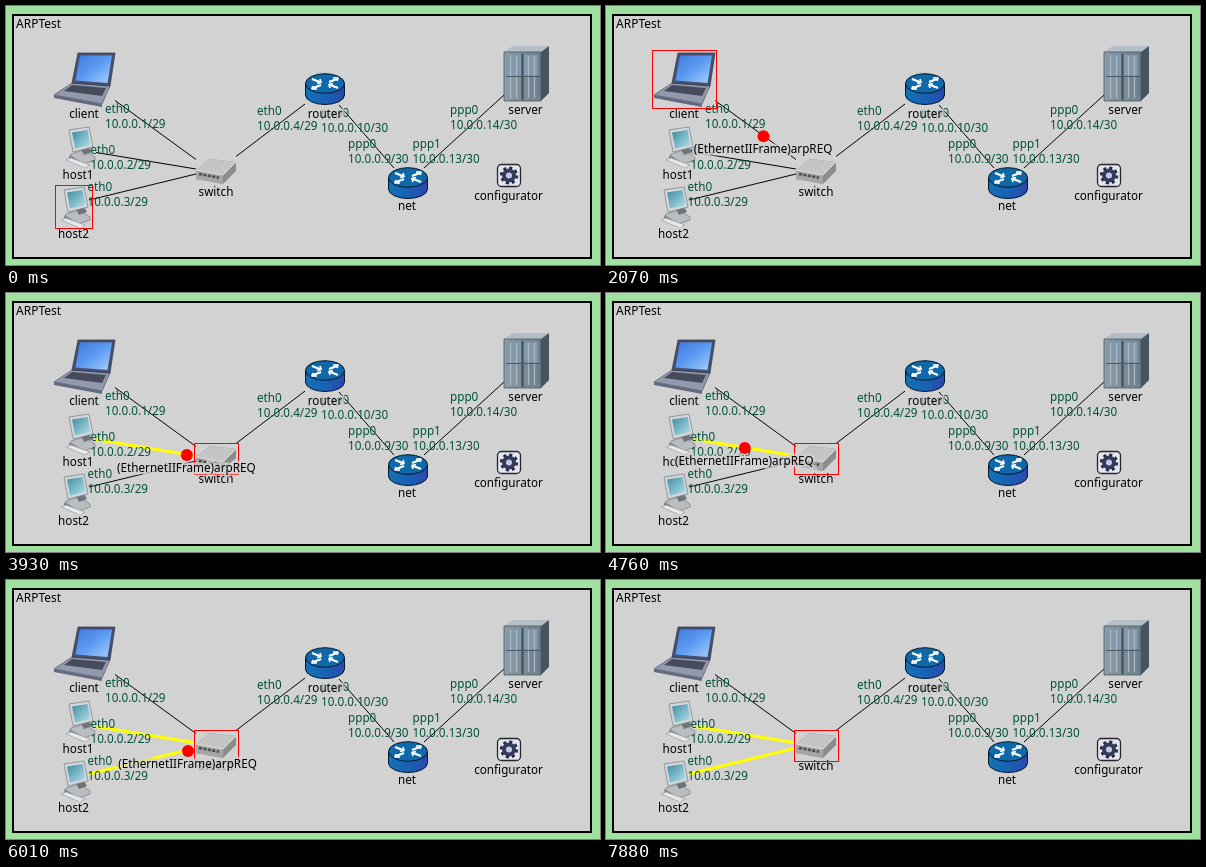
An HTML page for the animation above (8000 ms loop, 594 by 259 pixels).

```html
<!DOCTYPE html>
<html lang="en">
<head>
<meta charset="utf-8">
<title>Network simulation</title>
<style>
  html, body { margin: 0; width: 100%; height: 100%; overflow: hidden; background: #a0e0a0; }
  svg { display: block; width: 594px; height: 259px; }
  text { font: 11.7px "Noto Sans", "Open Sans", sans-serif; white-space: pre; }
  #ports { fill: #00503c; }
  #names { text-anchor: middle; }
  /* Labels dim whatever lies behind them */
  #names text, #packet text { paint-order: stroke; stroke: #d2d2d2; stroke-width: 5; stroke-opacity: .7; }
  #links { stroke: #000; }
  #links .hot { stroke: #ff0; stroke-width: 3; }
</style>
</head>
<body>
<svg viewBox="0 0 594 259">
  <defs>
    <linearGradient id="screen" x2="1" y2="1">
      <stop stop-color="#3f78dc"/><stop offset=".5" stop-color="#5d9cf2"/><stop offset="1" stop-color="#a8d0fa"/>
    </linearGradient>
    <linearGradient id="teal" x2="1" y2="1">
      <stop stop-color="#3f8ba0"/><stop offset="1" stop-color="#b4e2ea"/>
    </linearGradient>
    <linearGradient id="blue">
      <stop stop-color="#1272b4"/><stop offset=".5" stop-color="#1862b4"/><stop offset="1" stop-color="#2a48ac"/>
    </linearGradient>
    <linearGradient id="steel">
      <stop stop-color="#8d9ca6"/><stop offset="1" stop-color="#6c7f8c"/>
    </linearGradient>

    <g id="pc">
      <path d="M6 27l13-4 11 7v3l-14 5-12-7z" fill="#b9bdc0" stroke="#777b80" stroke-width=".7"/>
      <path d="M4 31l12 7v-3L5 28z" fill="#85898e"/>
      <path d="M16 22l8-2 3 5-8 3z" fill="#6d7378"/>
      <path d="M4 3l20-3 4 20-20 5z" fill="#d3d7da" stroke="#81878c" stroke-width=".8"/>
      <path d="M7 5.500l15.500-2.500 3 15-15.500 3.500z" fill="url(#teal)"/>
      <path d="M1 33l5-2 19 7-5 3z" fill="#e6e8ea" stroke="#8a8e92" stroke-width=".6"/>
    </g>

    <g id="hub" stroke-linejoin="round">
      <path d="M-19.500-5v11a19.500 9.500 0 0 0 39 0v-11z" fill="url(#blue)" stroke="#06182c"/>
      <ellipse cy="-5.500" rx="19.500" ry="9.800" fill="#0f68a8" stroke="#06182c"/>
      <g fill="none" stroke="#fff" stroke-width="2.200">
        <path d="M-13-10l9 3.500M-4-4l-9 3.500M4-7l9-3.500M13-1l-9-3.500"/>
        <path d="M-8-5.500l4-1-1-3.500M8-5.500l-4 1 1 3.500M8-11h5l-1 3M-8 0h-5l1-3" stroke-width="1.700"/>
      </g>
    </g>
  </defs>

  <rect width="594" height="259" fill="#a0e0a0"/>
  <rect x="7" y="9" width="578" height="243" fill="#d2d2d2" stroke="#000" stroke-width="2"/>
  <text x="10" y="22" style="font-size:12px">ARPTest</text>

  <g id="links"></g>

  <!-- laptop -->
  <path d="M66 77l38 3-8 18-48-9z" fill="#9299ac" stroke="#4d5368" stroke-width=".7"/>
  <path d="M66 79l34 3-4 8-38-5z" fill="#464b5c"/>
  <path d="M48 89l48 9v3l-48-9z" fill="#646a7e"/>
  <path d="M72 47h37l-5 33-38-3z" fill="#47506e" stroke="#2d3450" stroke-width=".7"/>
  <path d="M74 49.500h32l-4.500 27.500-32-2.500z" fill="url(#screen)"/>

  <use href="#pc" x="59" y="121"/>
  <use href="#pc" x="54" y="181"/>

  <!-- switch -->
  <path d="M190 164l14-11 26 3v9l-13 13-27-5z" fill="#8c8c8c"/>
  <path d="M190 164l14-11 26 3-13 13z" fill="#c4c4c4"/>
  <path d="M190 164l27 5v9l-27-5z" fill="#a5a5a5"/>
  <path d="M193 168l20 3.700" stroke="#4a4a4a" stroke-width="2.500" stroke-dasharray="3 1.500"/>
  <path d="M190 164l27 5 13-13" fill="none" stroke="#eee" stroke-width=".8"/>

  <use href="#hub" x="319" y="83"/>
  <use href="#hub" x="402" y="177"/>

  <!-- server -->
  <path d="M498 46l9-6h36l-8 6z" fill="#b4bec6"/>
  <path d="M535 46l8-6v47l-8 8z" fill="#465460"/>
  <path d="M498 46h37v49h-37z" fill="url(#steel)" stroke="#4a5862" stroke-width=".8"/>
  <path d="M501 49h31v20h-31z" fill="#8199aa"/>
  <path d="M504.500 50v42M510.500 50v42M522.500 50v42M528.500 50v42" stroke="#a9bac6" stroke-width="1.300"/>
  <path d="M516.500 48v46" stroke="#3c4c58" stroke-width="2"/>
  <path d="M500 70.500h34" stroke="#4c5c68"/>

  <!-- configurator -->
  <rect x="491.500" y="158.500" width="23" height="22" rx="4" fill="#e2e5f0" stroke="#26262c" stroke-width="1.300"/>
  <circle cx="503" cy="169.500" r="7.600" fill="none" stroke="#24273a" stroke-width="3" stroke-dasharray="3 2.970"/>
  <circle cx="503" cy="169.500" r="5" fill="#c4cae4" stroke="#343a5c" stroke-width="4"/>

  <g id="ports"></g>
  <g id="names"></g>
  <rect id="focus" fill="none" stroke="#f00"/>
  <g id="packet">
    <text x="-.5" y="17" text-anchor="middle">(EthernetIIFrame)arpREQ</text>
    <circle r="6" fill="#f00"/>
  </g>
</svg>
<script>
const $ = id => document.getElementById(id);
const STEP = 206.9, LOOP = 8000;

const links = [
  [109, 94.5, 190, 153.5], [90, 146.5, 190, 163], [83, 194, 190, 168],
  [230, 150.5, 299, 98], [333, 99, 388, 162], [418, 162, 498, 89]
];
const ports = [
  [99, 107, 'eth0', '1/29'], [84.5, 148, 'eth0', '2/29'], [81.5, 185, 'eth0', '3/29'],
  [251, 109, 'eth0', '4/29'], [315, 111, 'ppp0', '10/30'], [342, 142, 'ppp0', '9/30'],
  [406.5, 142, 'ppp1', '13/30'], [444, 108, 'ppp0', '14/30']
];
const names = [
  [78, 112, 'client'], [72, 173, 'host1'], [67.5, 232, 'host2'], [210, 190, 'switch'],
  [319, 112, 'router'], [401, 204, 'net'], [519.5, 108, 'server'], [502.5, 194, 'configurator']
];
// First step, then the box of the active node
const focuses = [
  [0, 49.5, 179.5, 37, 43], [1, 496.5, 37.5, 49, 59],
  [3, 46.5, 44.5, 64, 58], [15, 188.5, 150.5, 44, 31]
];
// First step, start point, move per step
const hops = [
  [5, 115, 98.8, 8.5, 6.3], [19, 180.8, 162, -10.5, -1.75], [29, 182, 171, -11.6, 2.8]
];
const HOP_STEPS = 9;

const text = (x, y, s) => `<text x="${x}" y="${y}">${s}</text>`;
$('links').innerHTML = links.map(([a, b, c, d]) =>
  `<line x1="${a}" y1="${b}" x2="${c}" y2="${d}"/>`).join('');
$('ports').innerHTML = ports.map(([x, y, port, ip]) =>
  text(x, y, port) + text(x, y + 15, '10.0.0.' + ip)).join('');
$('names').innerHTML = names.map(n => text(...n)).join('');

const lines = $('links').children;

function draw(now) {
  const step = Math.floor((now % LOOP + 12) / STEP);

  const [, x, y, width, height] = focuses.filter(f => f[0] <= step).pop();
  Object.entries({ x, y, width, height }).forEach(([k, v]) => $('focus').setAttribute(k, v));

  lines[1].classList.toggle('hot', step >= hops[1][0]);
  lines[2].classList.toggle('hot', step >= hops[2][0]);

  const hop = hops.find(([start]) => step >= start && step < start + HOP_STEPS);
  $('packet').style.display = hop ? '' : 'none';
  if (hop) {
    const [start, px, py, dx, dy] = hop, n = step - start;
    $('packet').setAttribute('transform', `translate(${px + n * dx} ${py + n * dy})`);
  }
  requestAnimationFrame(() => draw(performance.now()));
}
draw(0);
</script>
</body>
</html>
```
